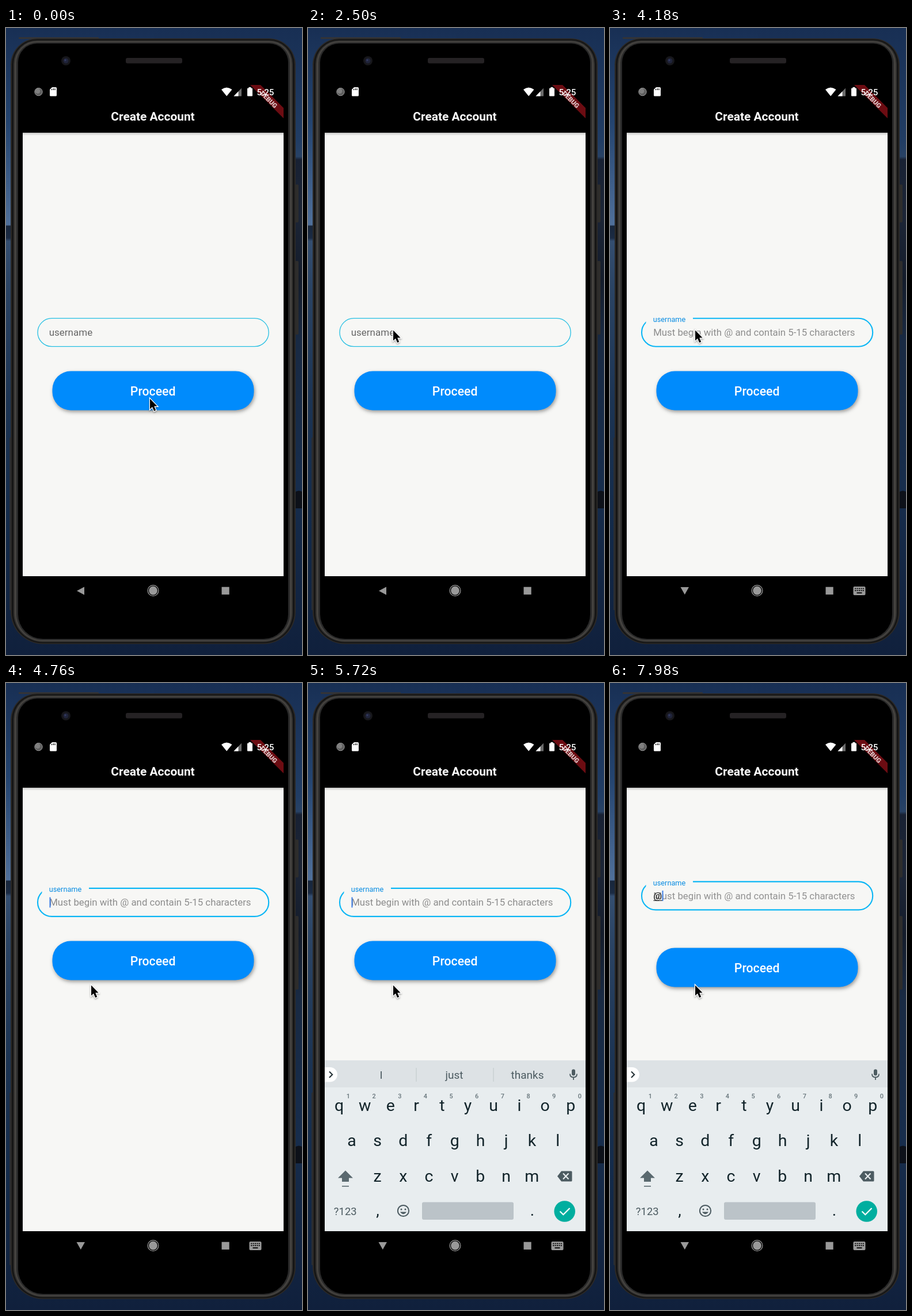
An HTML page with a canvas that plays this animation: 514x1090 px, repeating every 8 s.

```html
<!DOCTYPE html>
<html lang="en">
<head>
<meta charset="utf-8">
<title>Create account</title>
<style>
html, body { margin: 0; width: 100%; height: 100%; overflow: hidden; background: #152d50; }
canvas { display: block; width: 514px; height: 1090px; }
</style>
</head>
<body>
<canvas id="stage" width="514" height="1090"></canvas>
<script>
const g = document.getElementById('stage').getContext('2d');
const LOOP = 8000, FOCUS = 3400, RESIZE = 4720, KEYS = 5140, TYPED = 7950;
const PAGE = '#f7f7f5';

const clamp = v => Math.max(0, Math.min(1, v));
const lerp = (a, b, p) => a + (b - a) * p;

function box(x, y, w, h, r, fill, stroke, width = 1) {
  g.beginPath();
  g.roundRect(x, y, w, h, r);
  paint(fill, stroke, width);
}
function disc(x, y, r, fill, stroke, width = 1) {
  g.beginPath();
  g.arc(x, y, r, 0, 7);
  paint(fill, stroke, width);
}
function shape(d, fill, stroke, width = 1, x = 0, y = 0) {
  const path = new Path2D(d);
  g.save();
  g.translate(x, y);
  if (stroke) { g.strokeStyle = stroke; g.lineWidth = width; g.stroke(path); }
  if (fill) { g.fillStyle = fill; g.fill(path); }
  g.restore();
}
function paint(fill, stroke, width) {
  if (fill) { g.fillStyle = fill; g.fill(); }
  if (stroke) { g.strokeStyle = stroke; g.lineWidth = width; g.stroke(); }
}
function text(s, x, y, size, color, align = 'center', weight = 400) {
  g.font = `${weight} ${size}px Roboto, sans-serif`;
  g.textAlign = align;
  g.fillStyle = color;
  g.fillText(s, x, y);
}
function fade(x0, y0, x1, y1, stops) {
  const f = g.createLinearGradient(x0, y0, x1, y1);
  stops.forEach(([p, c]) => f.addColorStop(p, c));
  return f;
}
function shadow(color, blur, dx, dy) {
  g.shadowColor = color;
  g.shadowBlur = blur;
  g.shadowOffsetX = dx;
  g.shadowOffsetY = dy;
}

function wallpaper() {
  g.fillStyle = fade(0, 0, 0, 1090, [
    [0, '#182f54'], [.15, '#24446f'], [.26, '#41618c'], [.314, '#50709a'], [.316, '#18263b'],
    [.335, '#1b2b43'], [.34, '#344e70'], [.42, '#2a4363'], [.6, '#1c3453'], [.8, '#132a49'], [1, '#10203c']]);
  g.fillRect(0, 0, 257, 1090);
  g.fillStyle = fade(0, 0, 0, 1090, [
    [0, '#182f54'], [.18, '#213d64'], [.205, '#284265'], [.21, '#182133'], [.3, '#1c2536'],
    [.4, '#141c2b'], [.5, '#192a43'], [.73, '#172d4c'], [1, '#10203c']]);
  g.fillRect(257, 0, 257, 1090);
  shape('M500 808Q507 802 514 806V835H500Z', '#0d1119');
}

function phone() {
  box(502, 272, 6, 66, 2, '#2e2d2c');
  box(502, 405, 6, 128, 2, '#2e2d2c');
  box(6, 712, 3, 300, 1, '#2a2e34');
  box(22, 16, 139, 3, 1, '#343436');
  const layers = [[0, '#2b2927'], [2, '#151515'], [5, '#32312f'], [7, '#454340'], [10, '#2a2a2a'], [13, '#000']];
  for (const [i, c] of layers)
    box(8 + i, 18 + i * .7, 495 - 2 * i, 1053 - 1.4 * i, [46 - i, 46 - i, 56 - i, 56 - i], c);
  disc(104, 57, 8, '#17171b');
  disc(104, 57, 4.5, '#20243a');
  disc(103, 56, 1.7, '#343b60');
  box(208, 52, 98, 9.5, 3, '#252224');
}

function statusBar() {
  shape('M424 99H442L482 139V157Z', '#6c0c12');
  g.save();
  g.translate(456.5, 124.5);
  g.rotate(Math.PI / 4);
  text('DEBUG', 0, 4, 11.2, '#e0cccd', 'center', 900);
  g.restore();

  disc(56.5, 111, 6.7, '#5e5e5e', '#9b9b9b', 1);
  disc(55, 109.5, 4.5, '#808080');
  shape('M80 103H86.5Q88 103 88 104.5V117Q88 118.5 86.5 118.5H77.5Q76 118.5 76 117V107Z', '#fff');
  shape('M79.5 106V108M82.3 105V108M85 105V108', null, '#000', 1.2);
  shape('M374 107Q383 100 392.5 107L383.2 118.5Z', '#fff');
  shape('M395.5 118.5L409 104.5V118.5Z', '#6b6b6b');
  shape('M395.5 118.5L403.5 110.2V118.5Z', '#fff');
  box(419, 104.5, 9, 14, 1, '#fff');
  box(421.5, 102.8, 4, 2.5, 0, '#fff');
  text('5:25', 450.5, 116.8, 15.2, '#fff', 'center', 500);
}

function navBar(focused) {
  g.save();
  g.globalAlpha = .6;
  shape(focused ? 'M122.5 972H137L129.8 985Z' : 'M123 978.5L136 971.5V985.5Z', '#fff');
  disc(255.5, 978, 9.4, null, '#fff', 1.3);
  disc(255.5, 978, 7.4, '#fff');
  box(374.5, 971.7, 13.2, 13.2, 0, '#fff');
  if (focused) {
    box(422.5, 971, 21, 15, 2, '#fff');
    g.globalAlpha = 1;
    for (let i = 0; i < 10; i++)
      box(425.2 + i % 5 * 3.4, 973.5 + (i > 4) * 3.5, 2, 2, 0, '#111');
    box(428.5, 981, 9, 2, 0, '#111');
  }
  g.restore();
}

function field(t, y) {
  const p = clamp((t - FOCUS) / 240), focused = t >= FOCUS, typed = t >= TYPED;
  box(55, y - 24.5, 401.2, 49, 24.5, null, focused ? '#0ab6f5' : '#24bfe3', focused ? 2.1 : 1.3);
  if (focused) {
    g.fillStyle = PAGE;
    g.fillRect(62.5, y - 27, 81.5 * p ** .65, 13);
    g.globalAlpha = Math.sqrt(p) * (1 - clamp((t - TYPED) / 200) * .3);
    text('Must begin with @ and contain 5-15 characters', 75.2, y + 5.6, 16.8, '#8c8c8c', 'left');
    g.globalAlpha = 1;
  }
  const mix = [[102, 8], [102, 140], [102, 226]].map(([a, b]) => lerp(a, b, p));
  text('username', 74.7, y + lerp(5.6, -18, p), lerp(17, 12.75, p), `rgb(${mix})`, 'left');
  if (typed) {
    text('@', 75.2, y + 5.6, 16.8, '#1c1c1c', 'left');
    g.fillRect(75.5, y + 7.6, 15.5, 1.2);
  }
  const since = t - (typed ? TYPED : t >= RESIZE ? RESIZE : FOCUS);
  if (focused && since % 1000 < 500)
    box(typed ? 90.5 : 75.5, y - 9, 2, 18, 0, '#3f7fe4');
}

function button(y) {
  g.save();
  shadow('rgba(0,0,0,.38)', 6, 1.5, 3);
  box(80.5, y - 34.5, 350, 68, 32, '#008bfc');
  g.restore();
  text('Proceed', 255.1, y + 7.5, 21.2, '#fff', 'center', 500);
}

function keyRow(keys, x, y) {
  [...keys].forEach((k, i) => text(k, x + i * 44.7, y, 28.5, '#12242a'));
}

function keyboard(t) {
  const u = clamp((t - KEYS) / 200);
  if (!u) return;
  const slate = '#4c5b61';
  g.save();
  g.beginPath();
  g.rect(29, 182, 453, 822);
  g.clip();
  g.translate(0, 63 * (1 - u) ** 2);
  g.globalAlpha = Math.min(1, u * 2.67);
  box(29, 656, 453, 47, 0, '#dde2e5');
  box(29, 703, 453, 250, 0, '#e8edef');

  box(29, 668, 22, 25.5, [0, 12.7, 12.7, 0], '#fff');
  shape('M37 675.5L42.3 680.7L37 686', null, '#222f34', 2);
  if (t < TYPED) {
    ['I', 'just', 'thanks'].forEach((w, i) => text(w, 127 + 127 * i, 688, 19, slate));
    for (const x of [187.5, 321.5]) box(x, 669, 1, 24, 0, '#c0c7ca');
  }
  box(458, 671.5, 6, 11, 3, slate);
  shape('M455 679.5Q455 685.5 461 685.5T467 679.5M461 685.5V690', null, slate, 1.8);

  keyRow('qwertyuiop', 54, 743.5);
  [...'1234567890'].forEach((n, i) => text(n, 70 + i * 44.65, 722, 11, '#66747a', 'center', 500));
  keyRow('asdfghjkl', 76, 805);
  keyRow('zxcvbnm', 120.5, 866.5);
  shape('M65 847.5L78 860.5H71V867H59V860.5H52Z', '#5a696f');
  box(59, 874, 12, 1.6, 0, '#5a696f');
  shape('M433 857.5L440 848.5H457Q458.5 848.5 458.5 850V865Q458.5 866.5 457 866.5H440Z', slate);
  shape('M443 852.5L452.5 862.5M452.5 852.5L443 862.5', null, '#e8edef', 2.1);

  text('?123', 64.7, 924.5, 18.4, slate);
  text(',', 121, 926, 28, '#12242a');
  text('.', 389.5, 926, 28, '#12242a');
  disc(165.5, 917.5, 9.6, null, slate, 2);
  disc(162, 915, 1.5, slate);
  disc(169, 915, 1.5, slate);
  shape('M160 919.5Q165.5 927 171 919.5Z', slate);
  box(198, 902.5, 159, 30.5, 3, '#bbc3c8');
  disc(445.7, 918.5, 18.3, '#00ae9f');
  shape('M437.5 918.5L443.3 924.3L454.5 913', null, '#fff', 2.2);
  g.restore();
  if (u < 1) box(29, 953, 453, 51, 0, 'rgba(0,0,0,.2)');
}

// The mouse leaves the button, then glides to the field.
function pointer(t) {
  const a = clamp((t - 950) / 470) ** 2, b = 1 - (1 - clamp((t - 1420) / 1000)) ** 2;
  const x = lerp(lerp(248, 233, a), 146, b), y = lerp(lerp(641, 617, a), 522, b);
  const arrow = 'M2 3.5V21.5L6 17.8L9.2 25L12.2 23.6L9.2 16.6H14.6Z';
  g.save();
  shadow('rgba(0,0,0,.35)', 3, 0, 1.5);
  shape(arrow, null, '#fff', 2.6, x, y);
  g.restore();
  shape(arrow, '#000', null, 0, x, y);
}

function draw(t) {
  wallpaper();
  phone();
  box(29, 182, 453, 771, 0, PAGE);
  g.fillStyle = fade(0, 182, 0, 187, [[0, 'rgba(0,0,0,.2)'], [1, 'rgba(0,0,0,0)']]);
  g.fillRect(29, 182, 453, 5);
  statusBar();
  text('Create Account', 255, 161, 20.9, '#fff', 'center', 700);
  const [fieldY, buttonY] = t >= TYPED ? [369.9, 495] : t >= RESIZE ? [381.4, 483] : [529.2, 631];
  button(buttonY);
  field(t, fieldY);
  keyboard(t);
  navBar(t >= FOCUS);
  pointer(t);
}

const start = performance.now();
(function tick() {
  draw((performance.now() - start) % LOOP);
  requestAnimationFrame(tick);
})();
</script>
</body>
</html>
```
